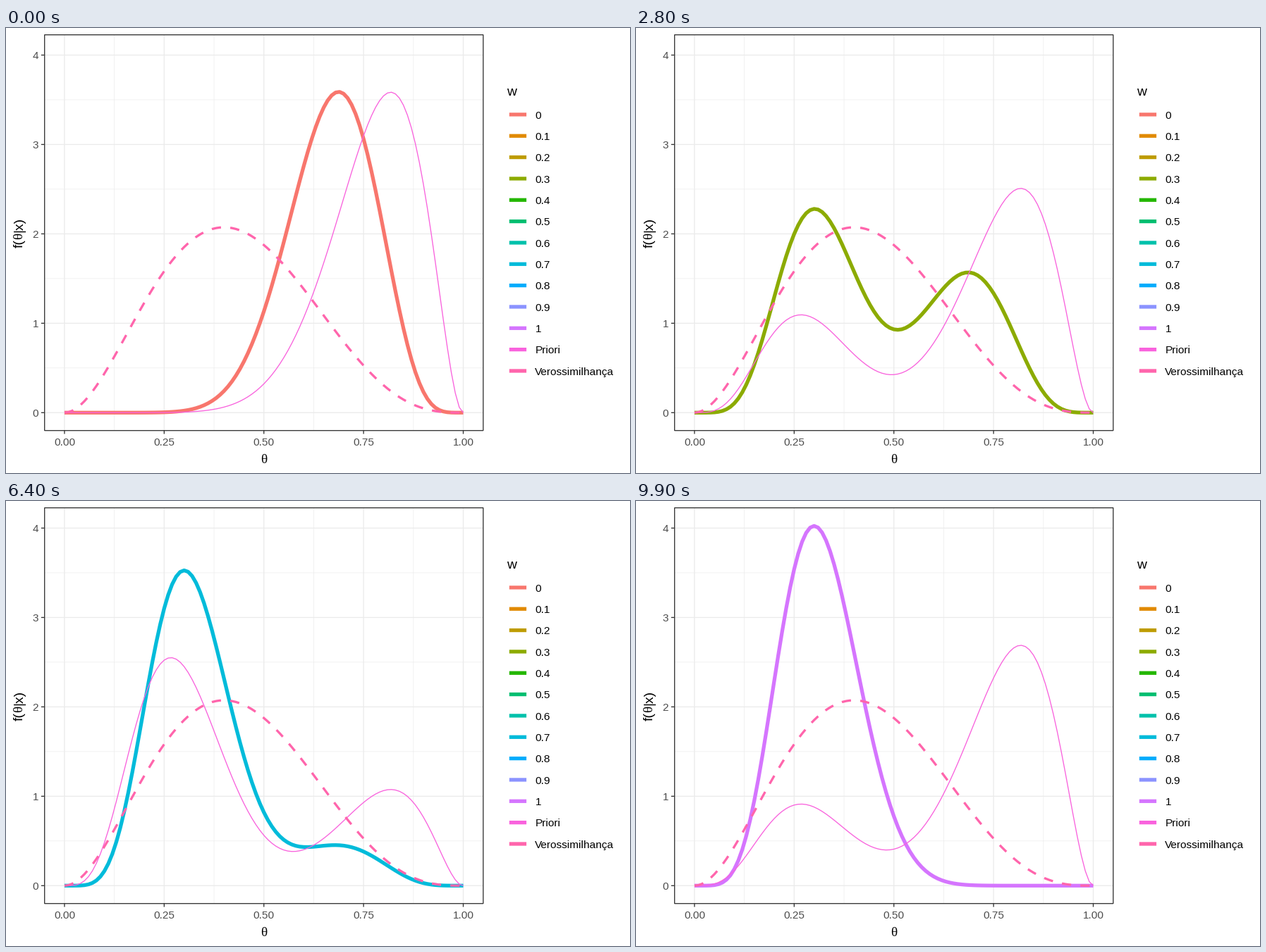
A matplotlib script for the animation above (10000 ms loop, 885 px wide and 632 px high).

```python
import math

import numpy as np
import matplotlib.pyplot as plt
from matplotlib.animation import FuncAnimation
from matplotlib.patches import Rectangle

plt.rcParams["path.snap"] = False

W, H = 885, 632
PX = 0.72  # points per pixel at 100 dpi
LEFT, RIGHT, TOP, BOTTOM = 54.7, 676.8, 9.66, 571.7
SMALL, LARGE = 15.45, 19.3
HAIR, THIN, MEDIUM, THICK = 0.66, 1.32, 3.29, 5.27
SANS, SERIF = "Liberation Sans", "Liberation Serif"
COLORS = ["#F8766D", "#E18A00", "#BE9C00", "#8CAB00", "#24B700", "#00BE70",
          "#00C1AB", "#00BBDA", "#00ACFC", "#8B93FF", "#D575FE", "#F962DD",
          "#FF65AC"]
LABELS = ["0"] + [f"0.{i}" for i in range(1, 10)] + ["1", "Priori", "Verossimilhança"]
PRIOR_COLOR, LIKELIHOOD_COLOR = COLORS[-2:]

# First frame and length of each move from one weight to the next.
STARTS = [5, 15] + list(range(25, 98, 9))
STEPS = [5, 5] + [4] * 9


def beta_const(a, b):
    return math.gamma(a + b) / (math.gamma(a) * math.gamma(b))


def beta_pdf(t, a, b):
    return beta_const(a, b) * t ** (a - 1) * (1 - t) ** (b - 1)


def prior(w):
    return w * beta_pdf(theta, 5, 12) + (1 - w) * beta_pdf(theta, 10, 3)


def posterior(w):
    low = w * beta_const(5, 12) / beta_const(7, 15)
    high = (1 - w) * beta_const(10, 3) / beta_const(12, 6)
    share = low / (low + high)
    return share * beta_pdf(theta, 7, 15) + (1 - share) * beta_pdf(theta, 12, 6)


def to_x(t):
    return 82.95 + 565.55 * t


def to_y(d):
    return 546.3 - 126.96 * d


def segment(x, y, color, width, **kw):
    kw.setdefault("solid_capstyle", "butt")
    return ax.plot(x, y, color=color, lw=width * PX, **kw)[0]


def label(x, y, text, size=SMALL, color="black", font=SANS, **kw):
    ax.text(x, y, text, fontsize=size * PX, color=color, family=font,
            va="baseline", **kw)


theta = np.linspace(0, 1, 101)
fig = plt.figure(figsize=(W / 100, H / 100), dpi=100, facecolor="white")
ax = fig.add_axes([0, 0, 1, 1])
ax.set_xlim(0, W)
ax.set_ylim(H, 0)
ax.axis("off")

# Grid: minor lines first, then major.
for offset, width in ((0.5, HAIR), (0, THIN)):
    for k in range(5):
        if k + offset <= 4:
            x, y = to_x((k + offset) / 4), to_y(k + offset)
            segment([x, x], [TOP, BOTTOM], "#EBEBEB", width, zorder=1)
            segment([LEFT, RIGHT], [y, y], "#EBEBEB", width, zorder=1)

# Axes
ax.add_patch(Rectangle((LEFT, TOP), RIGHT - LEFT, BOTTOM - TOP, fill=False,
                       ec="#333333", lw=THIN * PX, zorder=6))
for k in range(5):
    x, y = to_x(k / 4), to_y(k)
    segment([x, x], [BOTTOM, BOTTOM + 4.8], "#333333", THIN)
    segment([LEFT - 4.8, LEFT], [y, y], "#333333", THIN)
    label(x, 592.8, f"{k / 4:.2f}", color="#4D4D4D", ha="center")
    label(46, y + 5.8, str(k), color="#4D4D4D", ha="right")

label((LEFT + RIGHT) / 2, 617.8, "θ", LARGE, font=SERIF, ha="center")
for y, text, font in ((312.2, "f(", SANS), (300.4, "θ", SERIF), (290.4, "|x)", SANS)):
    label(23.4, y, text, LARGE, font=font, rotation=90, rotation_mode="anchor",
          ha="left")

# Legend
label(710, 95.8, "w", LARGE)
for i, (name, color) in enumerate(zip(LABELS, COLORS)):
    y = 122.9 + 30.34 * i
    segment([713.8, 738.1], [y, y], color, THICK)
    label(750.4, y + 5.7, name)

# Curves
posterior_line = segment([], [], COLORS[0], THICK, zorder=3)
prior_line = segment([], [], PRIOR_COLOR, THIN, zorder=4)
segment(to_x(theta), to_y(beta_pdf(theta, 3, 4)), LIKELIHOOD_COLOR, MEDIUM,
        zorder=5, linestyle=(0, (4, 4)), dash_capstyle="butt")


def weights(frame):
    """Index of the shown posterior and the moving weight of the prior."""
    for state, (start, steps) in enumerate(zip(STARTS, STEPS)):
        done = frame - start + 1
        if done < steps:
            part = max(done, 0) / steps
            following = (state + 1) % 11
            return state, (state + (following - state) * part) / 10


def update(frame):
    state, w = weights(frame)
    posterior_line.set_data(to_x(theta), to_y(posterior(state / 10)))
    posterior_line.set_color(COLORS[state])
    prior_line.set_data(to_x(theta), to_y(prior(w)))
    return posterior_line, prior_line


anim = FuncAnimation(fig, update, frames=100, interval=100, repeat=True,
                     repeat_delay=0, blit=False)
plt.show()
```
